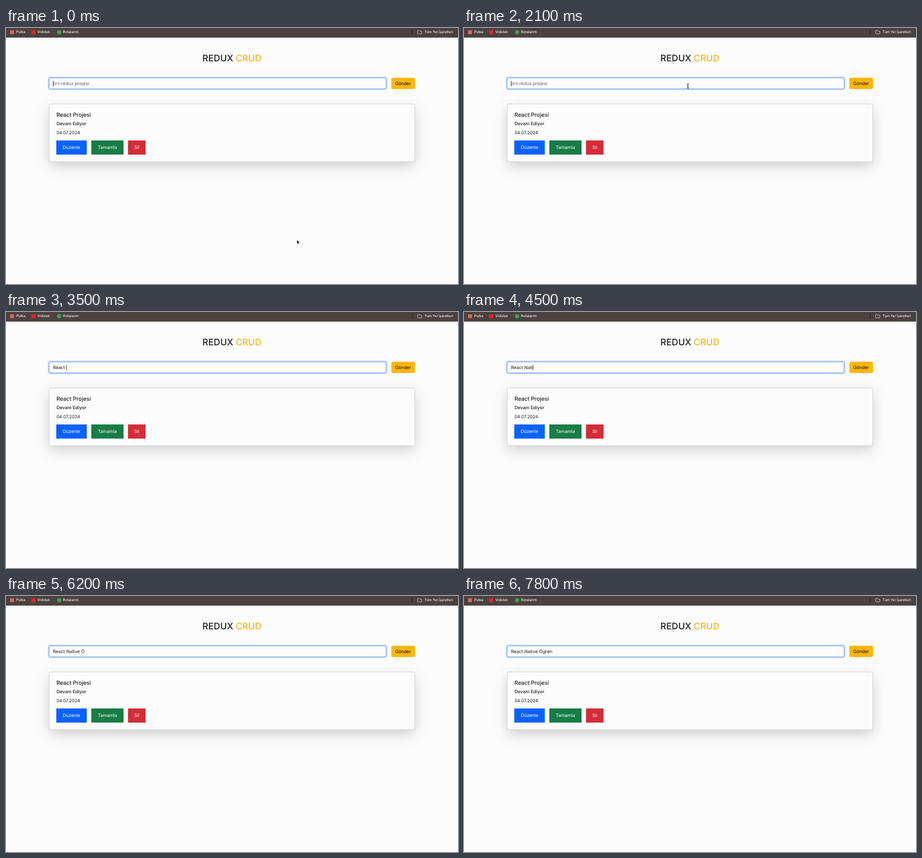
Animation, 800 px wide and 453 px high, one loop 8 s. Source, as an HTML page:

```html
<!DOCTYPE html>
<html lang="tr">
<head>
<meta charset="utf-8">
<title>Redux CRUD</title>
<style>
  html, body { margin: 0; width: 100%; height: 100%; overflow: hidden; background: #fcfcfc; }
  div, svg { position: absolute; box-sizing: border-box; }
  #bar { left: 0; top: 0; width: 100%; height: 16.5px; background: #4b4240; }
  #field { left: 76px; top: 88px; width: 597px; height: 20px; border: 1px solid #86b2fb;
    border-radius: 3px; background: #fcfcfc; box-shadow: 0 0 0 2px rgba(13, 100, 253, .27); }
  #card { left: 76px; top: 134px; width: 648px; height: 102.5px; border: 1px solid rgba(0, 0, 0, .16);
    border-radius: 3px; background: #fcfcfc; box-shadow: 0 8px 24px rgba(0, 0, 0, .175); }
  .btn { top: 199px; height: 24.5px; }
  svg { left: 0; top: 0; }
  text { font: 400 8px Inter, "Open Sans", sans-serif; fill: #1b1e21; white-space: pre;
    text-rendering: geometricPrecision; }
  .mark { font-size: 6.2px; font-weight: 500; fill: #f4f2f1; }
  .mid { font-weight: 500; }
  .light { fill: #fff; }
</style>
</head>
<body>
<div id="bar"></div>
<div id="field"></div>
<div style="left:681.5px;top:88px;width:42.5px;height:20px;border-radius:3px;background:#ffb60e"></div>
<div id="card"></div>
<div class="btn" style="left:89px;width:53.5px;background:#0962fe"></div>
<div class="btn" style="left:151px;width:57px;background:#177c46"></div>
<div class="btn" style="left:216px;width:31px;background:#d42c38"></div>

<svg width="800" height="453" viewBox="0 0 800 453">
  <rect x="7.2" y="4" width="6.8" height="6.8" fill="#e8635a"/>
  <rect x="44.8" y="4" width="6.8" height="6.8" fill="#f5212b"/>
  <circle cx="94" cy="7.4" r="3.6" fill="#3fa65a"/>
  <text class="mark" x="18" y="9.4">Pulka</text>
  <text class="mark" x="55.5" y="9.4">Vidolek</text>
  <text class="mark" x="100.8" y="9.4">Rotalarım</text>
  <path d="M719 3V11.500" stroke="#29211f"/>
  <path d="M728.600 9.300V5.200q0-.8.8-.8h1.900l.9 1h3q.8 0 .8.8v3.300q0 .8-.8.8h-5.800q-.8 0-.8-.8z"
    fill="none" stroke="#d9d5d3" stroke-width=".8"/>
  <text class="mark" x="740.800" y="9.400" style="font-size:6px">Tüm Yer İşaretleri</text>

  <text class="mid" x="399.800" y="58.700" text-anchor="middle" style="font-size:16px">REDUX <tspan fill="#f8b416">CRUD</tspan></text>
  <text id="value" x="83" y="101.400"></text>
  <rect id="caret" y="93.500" width=".8" height="9.500" fill="#16191c"/>
  <text x="702.700" y="101.400" text-anchor="middle" style="fill:#0c0c0c">Gönder</text>

  <text class="mid" x="89.200" y="157.200" style="font-size:9.800px">React Projesi</text>
  <text class="mid" x="89.400" y="172">Devam Ediyor</text>
  <text x="89.400" y="187.500" style="font-size:7.850px">04.07.2024</text>
  <text class="light" x="115.800" y="214.400" text-anchor="middle">Düzenle</text>
  <text class="light" x="179.500" y="214.400" text-anchor="middle">Tamamla</text>
  <text class="light" x="231.500" y="214.400" text-anchor="middle">Sil</text>

  <path id="arrow" d="M0 0V7.600L1.700 6.100 2.800 8.700 4 8.200 2.900 5.700H5.200z"
    fill="#000" stroke="#fff" stroke-width=".7" stroke-linejoin="round"/>
  <g id="beam" fill="none">
    <path d="M-2-3.800Q0-3.800 0-2.800Q0-3.800 2-3.800M0-3V3M-2 3.800Q0 3.800 0 2.800Q0 3.800 2 3.800M-1 .8H1"
      stroke="#111" stroke-width=".9"/>
  </g>
</svg>

<script>
const LOOP = 8000, STEP = 100, BLINK = 500, TEXT_X = 83;
const PHRASE = 'React Native Ögren';
const KEYS = [2200, 2400, 2600, 2800, 3000, 3500, 3800, 4000, 4200,
  4500, 4700, 4900, 5100, 5700, 6400, 6600, 7000, 7200];
const FROM = { x: 515, y: 374.500 }, TO = { x: 396.300, y: 102.800 }, MOVE_END = 700;

const get = id => document.getElementById(id);
const value = get('value'), caret = get('caret'), arrow = get('arrow'), beam = get('beam');
const show = (el, on) => el.setAttribute('visibility', on ? 'visible' : 'hidden');

function drawField(t) {
  const count = KEYS.filter(k => k <= t).length;
  const typed = PHRASE.slice(0, count);
  const text = typed || 'örn:redux projesi';
  if (value.textContent !== text) value.textContent = text;
  value.style.fill = typed ? '#1b1e21' : '#5b5e61';
  // The caret restarts its blink at each key.
  const since = t - (count ? KEYS[count - 1] : -200);
  caret.setAttribute('x', TEXT_X + (typed ? value.getComputedTextLength() : 0));
  show(caret, Math.floor(since / BLINK) % 2 === 0);
}

function drawPointer(t) {
  const p = Math.min(t / MOVE_END, 1), e = p * p * (3 - 2 * p);
  const x = FROM.x + (TO.x - FROM.x) * e, y = FROM.y + (TO.y - FROM.y) * e;
  const visible = t < KEYS[0], inField = y < 108;
  for (const el of [arrow, beam]) el.setAttribute('transform', `translate(${x} ${y})`);
  show(arrow, visible && !inField);
  show(beam, visible && inField);
}

const start = performance.now();
function frame() {
  const elapsed = (performance.now() - start) % LOOP;
  const t = Math.floor(elapsed / STEP) * STEP;
  drawField(t);
  drawPointer(t);
  requestAnimationFrame(frame);
}
frame();
</script>
</body>
</html>
```
